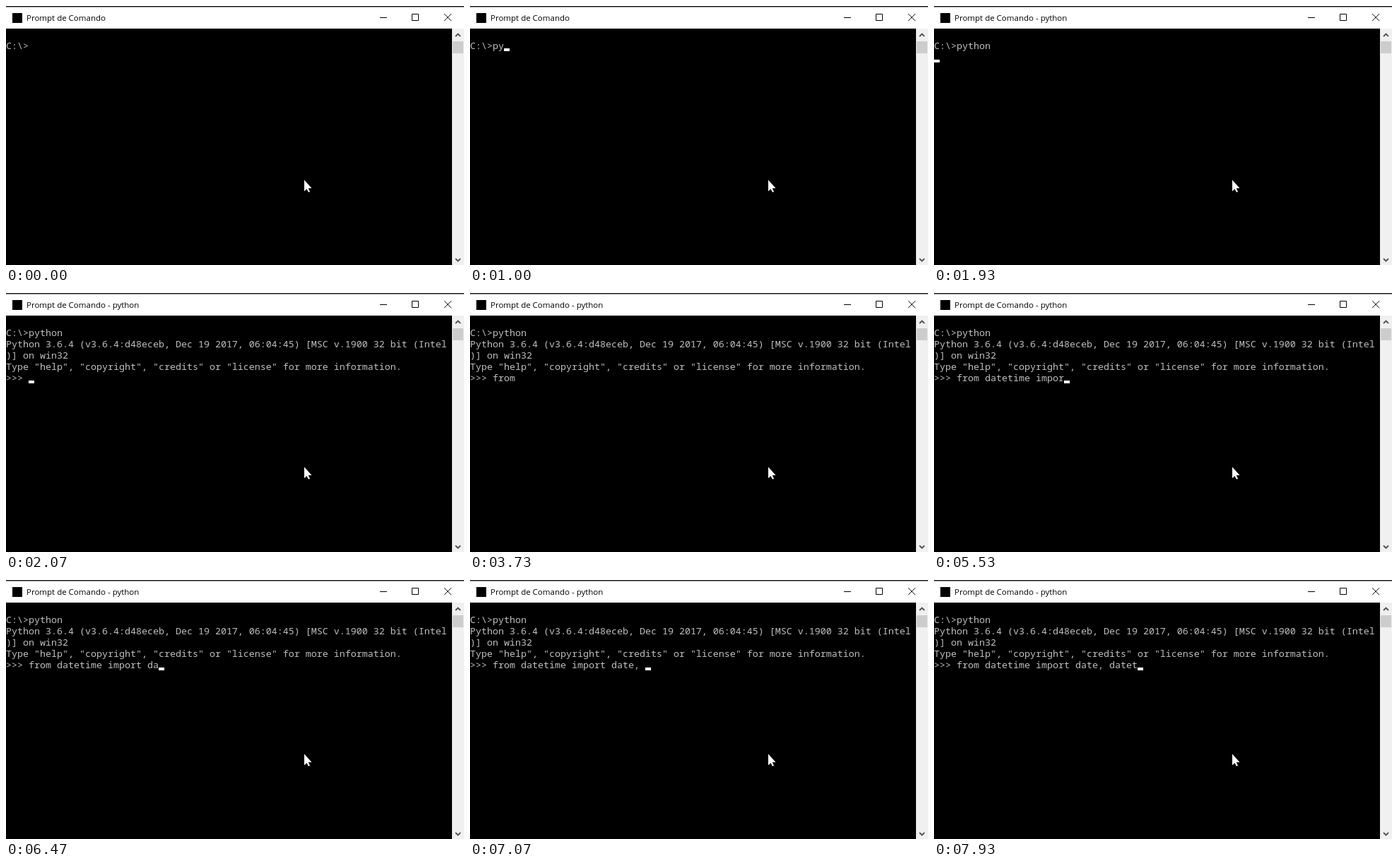
These frames come from a looping animation (648 by 367 pixels, 8000 ms). An HTML page:

```html
<!DOCTYPE html>
<html lang="pt">
<head>
<meta charset="utf-8">
<title>Prompt de Comando</title>
<style>
  html, body { margin: 0; width: 100%; height: 100%; overflow: hidden; background: #000; }
  svg, pre, #caret { position: absolute; }
  svg { left: 0; top: 0; }
  .title { font: 11.5px "Open Sans", "Noto Sans", sans-serif; fill: #000; }
  pre {
    left: 0; top: 32px; margin: 0;
    font: 13.3333px/16px "Noto Sans Mono", "DejaVu Sans Mono", monospace;
    font-variant-ligatures: none;
    color: #c0c0c0;
  }
  #caret { width: 8px; height: 4px; background: #fff; }
</style>
</head>
<body>
<svg width="648" height="367" viewBox="0 0 648 367">
  <rect width="648" height="32" fill="#fff"/>
  <rect width="648" height="1.5" fill="#1c1c1c"/>
  <rect x="9" y="10" width="14" height="14"/>
  <text class="title" id="title" x="29" y="21"></text>
  <g fill="none" stroke="#000">
    <path d="M529 16.5h10M574.5 11.5h9v9h-9z"/>
    <path d="M620 11.2l10 10M630 11.2l-10 10"/>
  </g>
  <rect x="631" y="32" width="17" height="335" fill="#f0f0f0"/>
  <rect x="632" y="50" width="15" height="17" fill="#cdcdcd"/>
  <path d="M636 43l3.5-3.5 3.5 3.5M636 358l3.5 3.5 3.5-3.5" fill="none" stroke="#505050" stroke-width="1.8"/>
  <path d="M422 246.5V262.5L425.5 259.2 428 264 430 263 427.7 258.2H432.5Z" fill="#fff"/>
</svg>
<pre id="screen"></pre>
<div id="caret"></div>
<script>
  const LOOP = 8000, CELL = 8, ROW = 16, TOP = 32;
  const LAUNCH = 1930;
  const OFF = null;
  const PROMPT = '\nC:\\>';
  const BANNER =
    'Python 3.6.4 (v3.6.4:d48eceb, Dec 19 2017, 06:04:45) [MSC v.1900 32 bit (Intel\n' +
    ')] on win32\n' +
    'Type "help", "copyright", "credits" or "license" for more information.\n';

  // Each entry prints text and shows the caret; OFF hides it.
  const events = [
    [0, OFF], [530, ''],
    [870, 'p'], [1000, 'y'], [1070, OFF], [1130, 't'], [1270, 'h'], [1330, 'o'], [1400, 'n'],
    [1600, OFF], [LAUNCH, '\n'], [2000, BANNER], [2070, '>>> '],
    [2670, OFF], [3200, ''],
    [3330, 'f'], [3530, 'r'], [3600, 'om'], [3730, OFF],
    [4000, ' d'], [4070, 'a'], [4270, 't'], [4330, 'e'], [4530, 't'],
    [4670, 'i'], [4730, 'm'], [4870, 'e'], [4930, ' '],
    [5070, 'i'], [5270, 'm'], [5330, 'p'], [5470, 'o'], [5530, 'r'], [5730, 't'], [5870, ' '],
    [6400, 'd'], [6470, 'a'], [6730, 't'], [6870, 'e'], [6930, OFF], [7000, ','], [7070, ' '],
    [7400, 'd'], [7470, 'a'], [7670, 't'], [7730, 'e'], [7930, 't']
  ];

  const [title, screen, caret] = ['title', 'screen', 'caret'].map(id => document.getElementById(id));
  let shown = -1;

  function render(t) {
    const past = events.filter(([at]) => at <= t);
    if (past.length === shown) return;
    shown = past.length;

    const text = PROMPT + past.map(([, s]) => s || '').join('');
    const lines = text.split('\n');
    screen.textContent = text;
    title.textContent = 'Prompt de Comando' + (t >= LAUNCH ? ' - python' : '');
    caret.style.left = lines[lines.length - 1].length * CELL + 'px';
    caret.style.top = TOP + lines.length * ROW - 4 + 'px';
    caret.style.visibility = past[shown - 1][1] === OFF ? 'hidden' : 'visible';
  }

  const start = performance.now();
  function tick() {
    render((performance.now() - start) % LOOP);
    requestAnimationFrame(tick);
  }
  tick();
</script>
</body>
</html>
```
